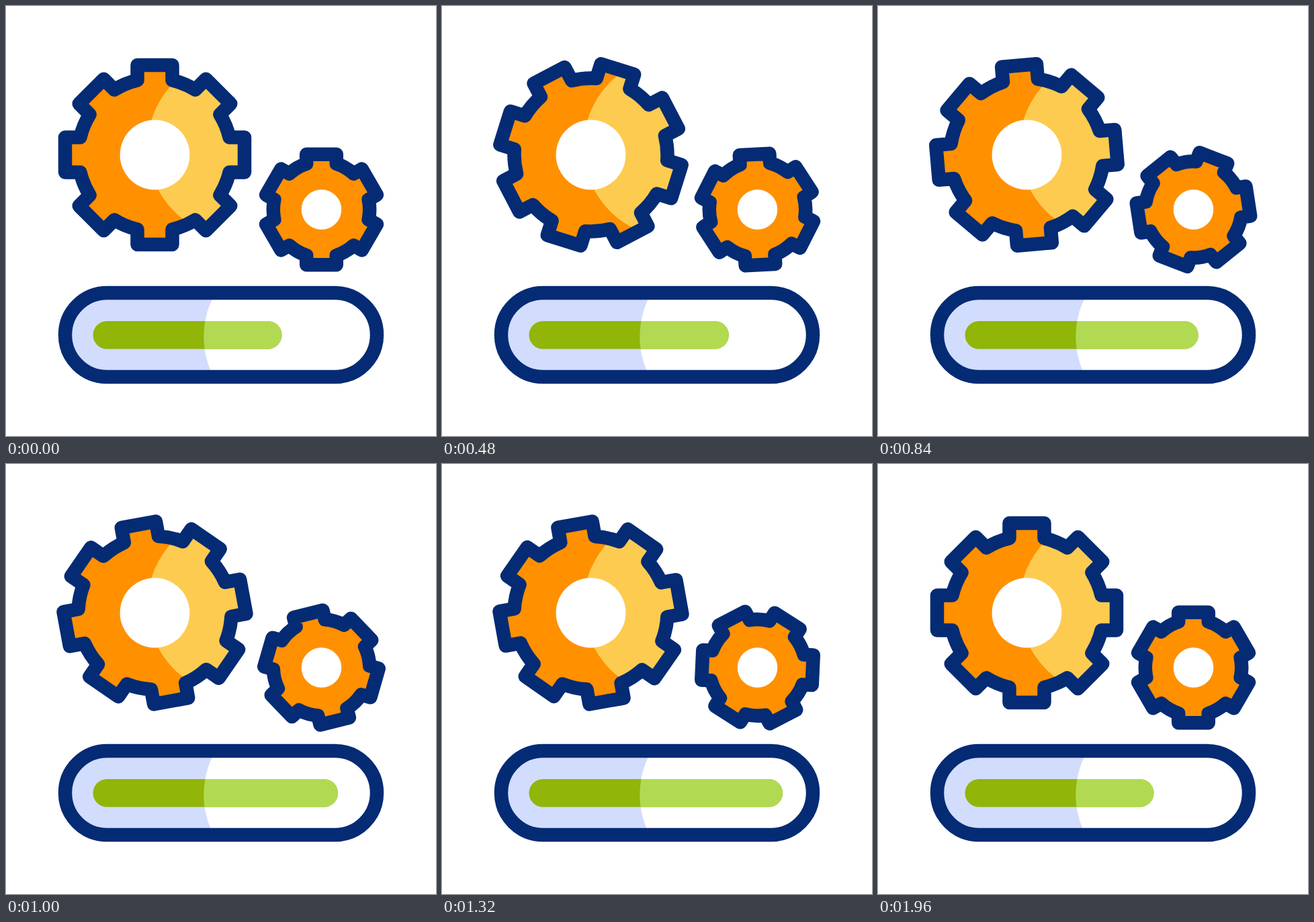
An HTML page that plays this animation: 640x640 px, repeating every 2000 ms.

```html
<!DOCTYPE html>
<html lang="en">
<head>
<meta charset="utf-8">
<title>Processing</title>
<style>
  html, body { margin: 0; width: 100%; height: 100%; overflow: hidden; background: #fff; }
  svg { display: block; width: 100vw; height: 100vh; }
  .outline { fill: none; stroke: #042b74; stroke-width: 20.5; stroke-linejoin: round; }
</style>
</head>
<body>
<svg viewBox="0 0 640 640">
  <defs>
    <path id="bigGear"/>
    <path id="smallGear"/>
    <clipPath id="gearLight"><circle cx="346.5" cy="209.5" r="136"/></clipPath>
    <clipPath id="barLight"><circle cx="424" cy="492" r="129.7"/></clipPath>
  </defs>

  <use href="#bigGear" fill="#ff9000"/>
  <g clip-path="url(#gearLight)"><use href="#bigGear" fill="#fdcb50"/></g>
  <use href="#bigGear" class="outline"/>
  <circle cx="221.5" cy="221.5" r="51.9" fill="#fff"/>

  <use href="#smallGear" fill="#ff9000"/>
  <use href="#smallGear" class="outline"/>
  <circle cx="469.5" cy="303" r="29.8" fill="#fff"/>

  <rect x="88" y="427" width="464" height="125" rx="62.5" fill="#d2dcfd"/>
  <g clip-path="url(#barLight)"><rect x="88" y="427" width="464" height="125" rx="62.5" fill="#fff"/></g>
  <rect class="outline" x="88" y="427" width="464" height="125" rx="62.5"/>
  <rect class="progress" x="129.5" y="469" height="41.5" rx="20.75" fill="#91b508"/>
  <g clip-path="url(#barLight)">
    <rect class="progress" x="129.5" y="469" height="41.5" rx="20.75" fill="#b1da52"/>
  </g>
</svg>
<script>
const LOOP = 2000, STEP = 40;
const bigGear = document.getElementById('bigGear');
const smallGear = document.getElementById('smallGear');
const progressBars = document.querySelectorAll('.progress');

// Square teeth on a round body, centred on the given point.
function gearPath(cx, cy, teeth, halfTooth, tipRadius, bodyRadius) {
  const root = Math.sqrt(bodyRadius ** 2 - halfTooth ** 2);
  let d = '';
  for (let i = 0; i < teeth; i++) {
    const a = i * 2 * Math.PI / teeth, c = Math.cos(a), s = Math.sin(a);
    const point = (x, y) => `${cx + x * c - y * s} ${cy + x * s + y * c}`;
    d += (i ? `A${bodyRadius} ${bodyRadius} 0 0 1 ` : 'M') + point(-halfTooth, -root)
      + 'L' + point(-halfTooth, -tipRadius)
      + 'L' + point(halfTooth, -tipRadius)
      + 'L' + point(halfTooth, -root);
  }
  return d + `A${bodyRadius} ${bodyRadius} 0 0 1 ${cx - halfTooth} ${cy - root}Z`;
}

// Symmetric cubic Bezier easing (.55, 0, .45, 1) between two times.
function ease(t, start, end) {
  const x = Math.min(1, Math.max(0, (t - start) / (end - start)));
  let lo = 0, hi = 1;
  for (let i = 0; i < 24; i++) {
    const p = (lo + hi) / 2;
    if (p * (1.65 + p * (1.3 * p - 1.95)) < x) lo = p; else hi = p;
  }
  const p = (lo + hi) / 2;
  return x === 0 || x === 1 ? x : p * p * (3 - 2 * p);
}

function draw(time) {
  const t = Math.floor((time % LOOP) / STEP) * STEP;
  const bigTurn = 180 * ease(t, 88, 1630);
  const smallTurn = -180 * ease(t, 302, 1822);
  const fill = ease(t, 45, 1400) - ease(t, 1400, 1960);
  bigGear.setAttribute('transform', `rotate(${bigTurn} 221.5 221.5)`);
  smallGear.setAttribute('transform', `rotate(${smallTurn} 469.5 303)`);
  progressBars.forEach(bar => bar.setAttribute('width', 281 + 97 * fill));
}

bigGear.setAttribute('d', gearPath(221.5, 221.5, 8, 26, 133.5, 114));
smallGear.setAttribute('d', gearPath(469.5, 303, 6, 22.3, 82.3, 71.7));

const started = performance.now();
function tick() {
  draw(performance.now() - started);
  requestAnimationFrame(tick);
}
draw(0);
requestAnimationFrame(tick);
</script>
</body>
</html>
```
